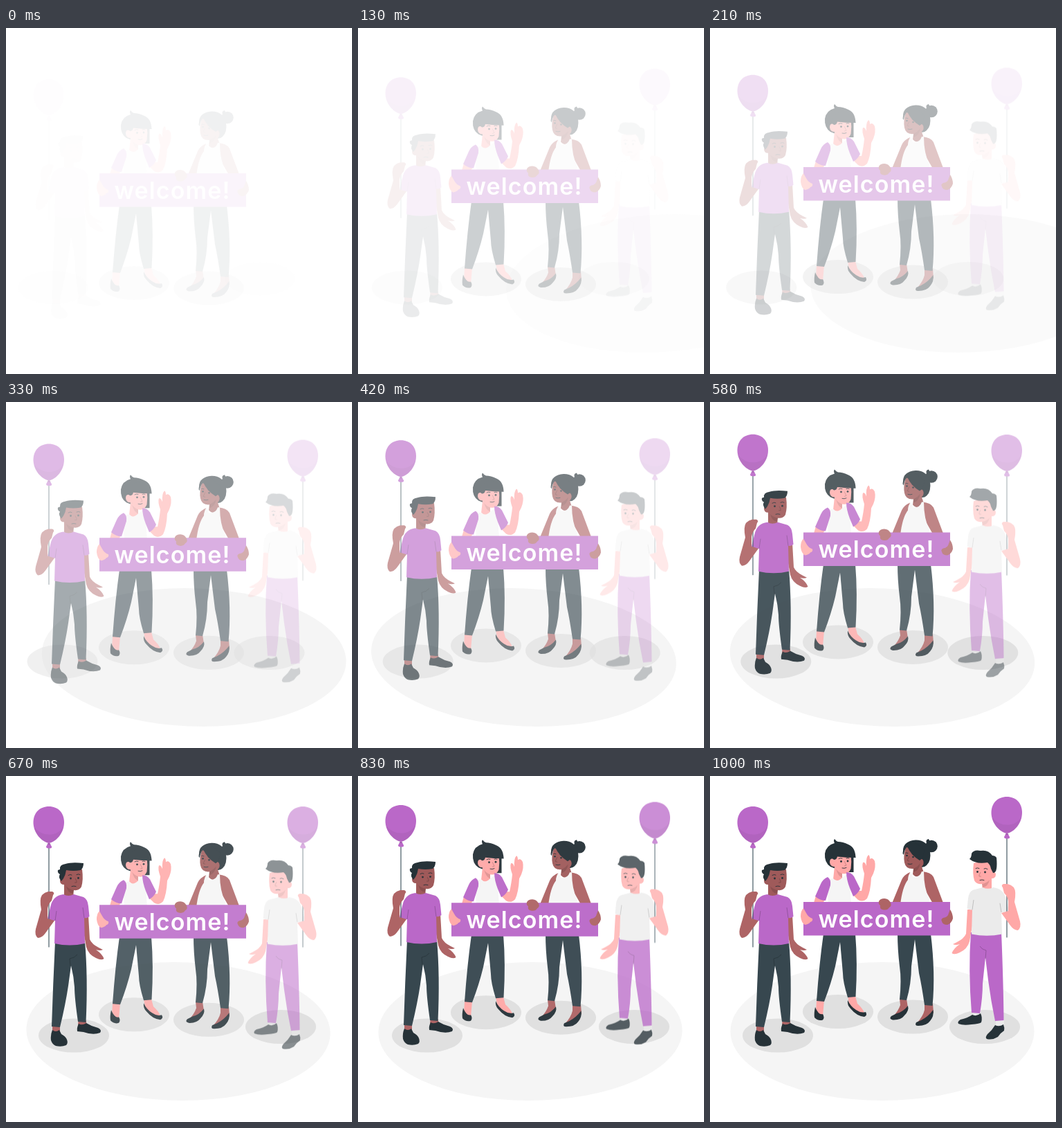
An HTML page that plays this animation: 500 by 500 pixels, repeating every 1.04 s.

```html
<!DOCTYPE html>
<html lang="en">
<head>
<meta charset="utf-8">
<title>Welcome</title>
<style>
  html, body { margin: 0; width: 100%; height: 100%; overflow: hidden; background: #fff; }
  svg { display: block; width: 100vw; height: 100vh; }
  text { font: 600 34px Inter, "Open Sans", sans-serif; letter-spacing: 1.1px; fill: #fff; text-anchor: middle; }
  .dark { fill: #263238; }
  .slate { fill: #37474f; }
  .purple { fill: #ba68c8; }
  .white { fill: #f5f5f5; }
  .pale { fill: #ebebeb; }
  .pink { fill: #ffa8a7; }
  .brown { fill: #ae6465; }
  .tan { fill: #9f5a5a; }
  .shadow { fill: #e0e0e0; }
  .skin { fill: var(--skin); }
  .face { fill: var(--face); }
  .shirt { fill: var(--shirt); }
  .shade { fill: #000; opacity: .12; }
  .line { fill: none; stroke: #263238; stroke-width: .9; stroke-linecap: round; }
  .fold { fill: none; stroke: #000; stroke-width: .8; opacity: .25; }
  .man1 { --skin: #ae6465; --face: #9f5a5a; --shirt: #ba68c8; }
  .man2 { --skin: #ffa8a7; --face: #ffa8a7; --shirt: #ebebeb; }
</style>
</head>
<body>
<svg viewBox="0 0 500 500">
  <defs>
    <g id="balloon">
      <path class="line" d="M62 103V247" style="stroke:#455a64;stroke-width:1.2"/>
      <path class="purple" d="M62 97C51 95 39.500 82 39.500 67C39.500 53 49 44 62 44S84 53 84 67C84 82 73 95 62 97Z"/>
      <path class="shade" style="opacity:.05" d="M62 97C52 95 43 85 40.500 74Q52 87 68 84Q78 82 83 73C80 85 72 95 62 97Z"/>
      <path class="purple" d="M62 95L58 102Q58 104 61 104.500H64Q66.500 104 66 102Z"/>
      <path class="shade" d="M60 97H64L65 99H59Z"/>
    </g>

    <path id="arm" class="skin" d="M108 201L119 201L121 236Q124 243 134 248L140 251Q136 253 130 251Q139 257 141.500 264Q138 267 130 263Q119 258 116 247L112 225Z"/>

    <path id="fist" class="skin" d="M60 206L70 209Q62 220 57 227Q52 234 46 234Q41 230 43 221L51 193Q48 178 52 172Q56 168 61 167L67 167Q71 169 68 172L66 180Q61 185 60 192Z"/>

    <g id="shirt">
      <path class="shirt" d="M83 171Q75 172 71 176Q66 180 64 190L60 206Q65 210 71 209L70 242Q92 247 114 242L113 205Q117 206 120.500 203L119 188Q118 178 112 175L98 171Q90 175 83 171Z"/>
      <path class="fold" d="M71 209L73 195M113 205L111 190"/>
    </g>

    <g id="face">
      <path class="face" d="M83 137Q95 129 110 135Q112 150 109 160Q106 166 98 165Q97 171 98 173Q90 177 84 172V157Q78 157 78 151Q79 146 83 148Z"/>
      <path class="shade" d="M98 165Q90 163 87 159Q89 169 97 170Z"/>
      <circle class="dark" cx="93.500" cy="148" r="1.400"/>
      <circle class="dark" cx="104.500" cy="147.500" r="1.400"/>
      <path class="line" d="M90 143.500Q93 141.500 95 143M102 142.500Q105 141 107 142.500M95 159.500Q98 158.500 101 159.500"/>
      <path class="fold" d="M100 148Q103 153 102 154L99 154"/>
    </g>
  </defs>

  <ellipse id="floor" cx="249" cy="369" rx="219.500" ry="100" class="white"/>

  <g id="shadows" class="shadow">
    <ellipse cx="98" cy="375" rx="51" ry="24.500"/>
    <ellipse cx="397" cy="362.500" rx="51" ry="24.500"/>
  </g>

  <g id="pair">
    <g class="shadow">
      <ellipse cx="185" cy="340.500" rx="51" ry="24.500"/>
      <ellipse cx="293" cy="348" rx="51" ry="24.500"/>
    </g>

    <!-- girl with the short bob -->
    <path class="pink" d="M154 324H165L163 347Q157 350 153 342ZM199 318H210L213 329Q220 335 223 342Q210 342 202 334Z"/>
    <path class="dark" d="M152 334Q150 343 151 349Q156 354.500 163 352.500Q166 349 163 344Q157 346 152 334Z"/>
    <path class="dark" d="M199 324Q198 331 203 336Q212 347 223 348Q228 346 225 341Q218 343 211 338Q203 333 199 324Z"/>
    <path class="slate" d="M164 228H210Q213.500 270 210.500 319L199 320Q192 297 192 285L188 240L181 275Q175 300 165 326L154 325Q158 270 164 228Z"/>
    <path class="dark" d="M174 131Q165 125 166 112Q168 100 180 97Q178 93 180 91Q182 94 185 95Q192 95 200 99Q210 103 210.500 118L207.500 118V139H194Z"/>
    <path class="pink" d="M179 113H203.500Q205 124 203.500 134Q200 143 191 141L191 150Q184 155 178 149L180 131Q174 131 173 125Q173 118 179 120Z"/>
    <path class="shade" d="M191 141Q185 139 182 134Q185 145 191 147Z"/>
    <path class="dark" d="M176 118Q174 108 190 101Q206 104 210.500 118Q196 118 184 116.500Q183 121 179 121Z"/>
    <circle class="dark" cx="189.500" cy="123.500" r="1.400"/>
    <circle class="dark" cx="199" cy="123" r="1.400"/>
    <path class="line" d="M186 119.500Q188 118 191 119M197 119Q199 118 201 119M191 133Q194 134 197 132.500"/>
    <path class="fold" d="M194 123L197 129L194 130"/>
    <path class="pink" d="M153 173L166 178Q163 185 160 190L148 190Z"/>
    <path class="pink" d="M207 172L214 166L219 166Q222 152 223 141Q219 130 221 125Q224 124 226 130Q225 118 229 114Q231 115 231 120Q235 117 238 123Q240 131 236 141L233 147Q232 167 227 177Q221 183 214 179Z"/>
    <path class="white" d="M178 148Q184 155 192 146L201 140L204 186H171L169 150Z"/>
    <path class="purple" d="M170 146Q163 149 160 156L152 174Q159 180 167 180L174 158Q175 149 170 146Z"/>
    <path class="purple" d="M197 139Q204 139 208 145L217 163Q214 170 207 174L202 162Q197 149 197 139Z"/>

    <!-- girl with the bun -->
    <path class="brown" d="M274 322H284L286 335L276 346L264 348Q272 340 275 331ZM310 329H322L323 342L312 354L299 357Q308 347 310 338Z"/>
    <path class="dark" d="M286 332Q279 341 270 343L262 347Q258 351 264 352.500Q276 353 281 346Q288 339 286 332Z"/>
    <path class="dark" d="M322.500 338Q315 348 305 353L298 356Q295 361 301 361Q313 361 318 354Q324 347 322.500 338Z"/>
    <path class="slate" d="M271 228H319Q326 285 321.500 332L310 331Q306 303 302 285L296 236L291 275Q291 300 284 324L274 323Q277 295 274 275Q271 250 271 228Z"/>
    <circle class="dark" cx="320" cy="101.500" r="8.800"/>
    <path class="dark" d="M313 97Q311 92 316 91L318 95Z"/>
    <path class="dark" d="M279 108Q279 94 297 92.500Q313 92 318 108Q320 123 313 129Q309 133 303 131L284 103Z"/>
    <path class="tan" d="M283 103Q279 116 281 125Q283 135 294 134L293 142Q300 150 309 140L306 131Q310 127 308 122Q306 118 303 121L300 106Z"/>
    <path class="shade" d="M294 134Q300 131 304 126Q302 137 294 139Z"/>
    <path class="dark" d="M278.500 112Q279 97 295 95L310 107L307 119L303 122Q291 115 285 102Q281 106 280 114Z"/>
    <circle class="dark" cx="284.500" cy="115" r="1.300"/>
    <circle class="dark" cx="293.500" cy="117" r="1.300"/>
    <path class="line" d="M283 111L286 111.500M292 112.500L296 114M286 127Q289 128 292 127"/>
    <path class="fold" d="M288 116L285 122L288 123"/>
    <path class="brown" d="M289 139Q280 143 277 150L263 184H276L283 163ZM307 138Q319 139 323 146L338 186H323L311 165Z"/>
    <path class="white" d="M291 138Q286 142 286 150Q278 160 275 186H316L317 178Q309 162 309 138H306Q303 147 293 146Z"/>

    <!-- banner -->
    <path class="purple" d="M135 182H347V230.500H135Z"/>
    <text x="240.500" y="218.500">welcome!</text>
    <path class="pink" d="M135 191Q131 195 131 203Q132 212 137 215Q143 214 145 211Q149 210 148 206Q142 204 139 198Z"/>
    <path class="brown" d="M261 183Q258 177 252 177Q246 177 244 181Q243 185 246 187Q245 192 249 193Q256 195 259 190Q263 188 261 183Z"/>
    <path class="brown" d="M347 193Q351 199 351 206Q349 213 343 215Q336 215 335 210Q333 207 337 205Q344 204 345 198Z"/>
  </g>

  <g id="left" class="man1">
    <use href="#face"/>
    <path class="brown" d="M67 360H78V370H67ZM104.500 353H115.500L117 361H104Z"/>
    <path class="dark" d="M67 367Q64 374 65 382Q67 388 72 390Q80 392 87 389Q90 386 88 381Q86 376 80 373L77 367Q72 371 67 367Z"/>
    <path class="dark" d="M105 358Q102 364 103 369L112 370Q126 375 136 371Q139 367 133 364Q124 362 116 357Q110 361 105 358Z"/>
    <use href="#arm"/>
    <path class="slate" d="M71 239L114 239Q118.500 290 115.500 356L104 355Q99 320 99 305Q98 290 94 274L90 303Q86 330 78 363L66 362Q68 300 71 239Z"/>
    <path class="fold" d="M93 275L92 264Q99 263 103 258"/>
    <use href="#shirt"/>
    <path class="dark" d="M80 152Q75 146 78 142Q74 140 75 136L78 135Q77 128 86 127Q95 124 112 126Q112 133 108 136Q97 138 87 136Q86 143 83 148Z"/>
    <use href="#balloon"/>
    <use href="#fist"/>
  </g>

  <g id="right" class="man2">
    <use href="#face" transform="translate(491 -9) scale(-1 1)"/>
    <path class="pale" d="M380 339H391V349H380ZM413 351H425V366H413Z"/>
    <path class="dark" d="M379 345Q372 350 362 352Q357 355 359 358Q366 361 378 359Q390 358 392 356Q394 349 391 343Q385 348 379 345Z"/>
    <path class="dark" d="M412 360Q408 367 401 373Q397 378 400 380Q408 382 416 377Q420 371 425 368Q426 364 424 359Q418 363 412 360Z"/>
    <use href="#arm" transform="translate(491 -8) scale(-1 1)"/>
    <path class="purple" d="M421 225L377 226Q373 280 378 342L390 343Q394 320 394 300L398 262L402 295Q406 325 412 354L424.500 353Q424 300 421 225Z"/>
    <path class="fold" d="M398 264L399 252Q393 251 390 246"/>
    <use href="#shirt" transform="translate(492 -1.500) scale(-1 .95)"/>
    <path class="dark" d="M375 120Q378 117 378 112Q381 106 391 108Q402 106 408 115Q412 115 414 118Q415 128 414 134Q413 140 409 140L406 134Q405 128 401 125Q385 128 375 120Z"/>
    <use href="#balloon" x="367" y="-14"/>
    <use href="#fist" transform="translate(491 -11) scale(-1 1)"/>
  </g>
</svg>
<script>
  const LOOP = 1040, STEPS = 25, RISE = 30;
  const part = id => document.getElementById(id);
  const mix = (a, b, p) => a + (b - a) * p;

  // CSS-style timing curve, solved by bisection
  function bezier(x1, y1, x2, y2) {
    const at = (a, b, s) => 3 * a * s * (1 - s) ** 2 + 3 * b * s * s * (1 - s) + s ** 3;
    return x => {
      if (x >= 1) return 1;
      let lo = 0, hi = 1;
      for (let i = 0; i < 24; i++) {
        const mid = (lo + hi) / 2;
        if (at(x1, x2, mid) < x) lo = mid; else hi = mid;
      }
      return at(y1, y2, lo);
    };
  }
  const easeOut = bezier(0, 0, .58, 1);
  const easeIn = bezier(.42, 0, 1, 1);
  const overshoot = bezier(.36, -.01, .5, 1.38);

  function place(id, transform, opacity) {
    part(id).setAttribute("transform", transform);
    part(id).setAttribute("opacity", Math.max(0, Math.min(1, opacity)));
  }
  const rise = (id, p) => place(id, `translate(0 ${RISE * (1 - p)})`, p);

  // The floor rushes in from the right, leaning one way and then the other
  function moveFloor(x) {
    const p = overshoot(x / .6);
    let lean;
    if (x < .6) lean = mix(-20, 10, p);
    else if (x < .8) lean = mix(10, -2, overshoot((x - .6) / .2));
    else lean = mix(-2, 0, overshoot((x - .8) / .2));
    const shift = x < .6 ? 250 * (1 - p) : 0;
    place("floor", `translate(${249 + shift} 369) skewX(${lean}) translate(-249 -369)`, p);
  }

  function draw(now) {
    const step = Math.min(STEPS - 1, Math.floor((now % LOOP + 5) / (LOOP / STEPS)));
    const x = (step + 1) / STEPS;
    const bouncy = overshoot(x);
    moveFloor(x);
    place("shadows", `translate(${RISE * (bouncy - 1)} 0)`, bouncy);
    rise("pair", easeOut(x));
    rise("left", bouncy);
    rise("right", easeIn(x));
  }

  const start = performance.now();
  function tick() {
    draw(performance.now() - start);
    requestAnimationFrame(tick);
  }
  tick();
</script>
</body>
</html>
```
